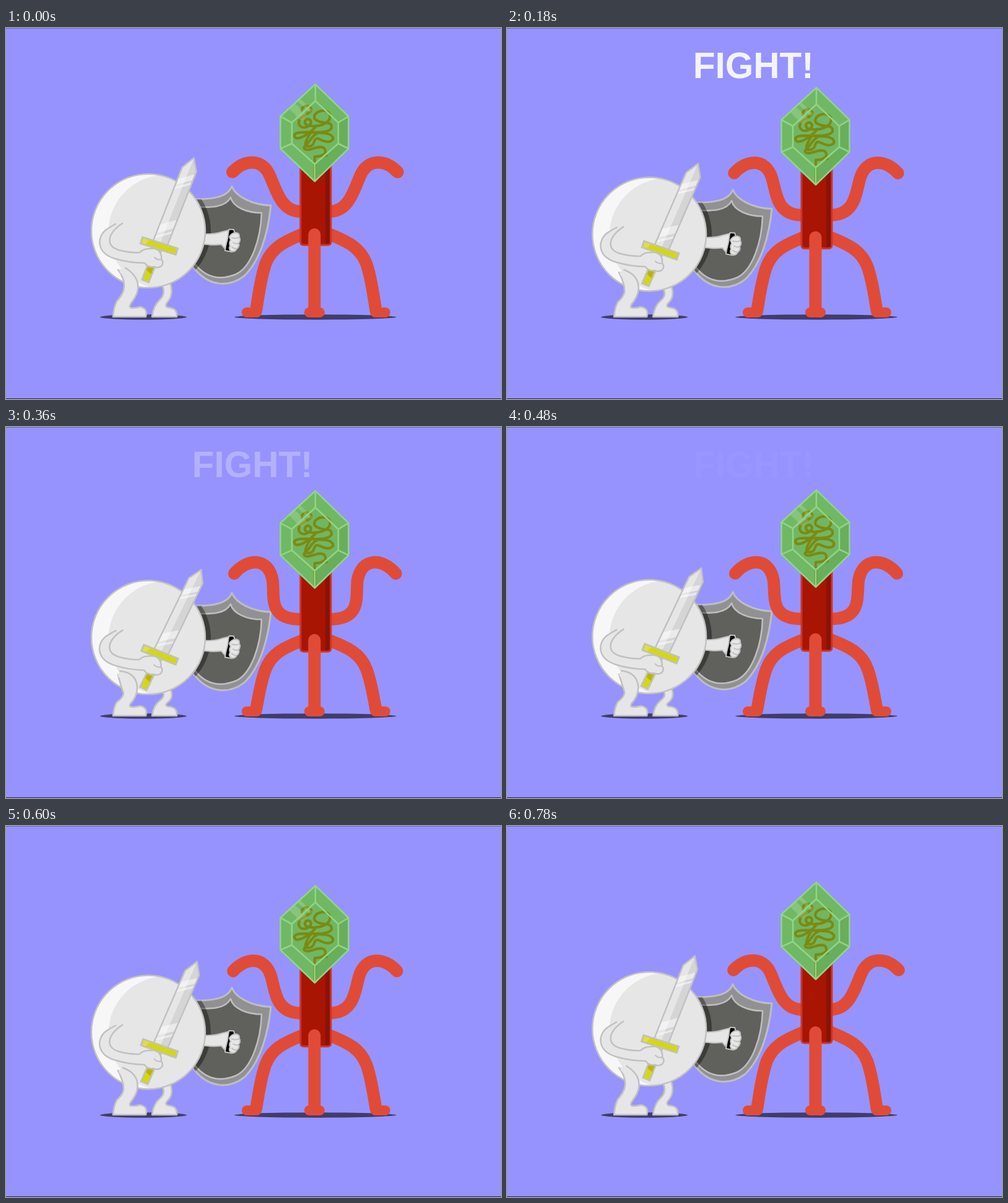
An HTML page that plays this animation: 800x600 px, repeating every 810 ms.

```html
<!DOCTYPE html>
<html lang="en">
<head>
<meta charset="utf-8">
<title>Fight</title>
<style>
  html, body { margin: 0; width: 100%; height: 100%; overflow: hidden; background: #9693ff; }
  svg { display: block; width: 800px; height: 600px; }
  .limb { fill: none; stroke: #e04b38; stroke-width: 20; stroke-linecap: round; stroke-linejoin: round; }
  .foot { fill: none; stroke: #e04b38; stroke-width: 16; stroke-linecap: round; }
  .pale { fill: #e6e6e6; stroke: #c1c1c1; stroke-width: 2.6; stroke-linejoin: round; stroke-linecap: round; }
  .line { fill: none; stroke: #c1c1c1; stroke-width: 2.5; stroke-linecap: round; stroke-linejoin: round; }
  .thin { stroke-width: 2; }
  .gold { fill: #d3d811; stroke: #c1c1c1; stroke-width: 2.6; }
  .edge { fill: none; stroke: #91d488; stroke-width: 2.6; stroke-linejoin: round; }
</style>
</head>
<body>
<svg viewBox="0 0 800 600">
  <defs>
    <clipPath id="ball"><circle cx="230" cy="328" r="92"/></clipPath>
    <clipPath id="shield"><path id="rim" d="M365 256C371 272 397 286 428 287C424 328 412 375 385 401C362 419 328 420 303 387V277C330 277 358 275 365 256Z"/></clipPath>
    <clipPath id="blade"><path id="steel" d="M-12 0V-132L0 -153L12 -134V0Z"/></clipPath>
  </defs>
  <rect width="800" height="600" fill="#9693ff"/>
  <rect width="800" height="1" fill="#6a68b6"/>
  <rect y="599" width="800" height="1" fill="#24204a"/>
  <text id="title" x="300.8" y="81" fill="#fff" font-family="'Liberation Sans', Arial, sans-serif" font-weight="700" font-size="58.5">FIGHT!</text>

  <g fill="#403d68">
    <ellipse cx="222" cy="467.5" rx="70" ry="4.2"/>
    <ellipse cx="500" cy="467.5" rx="131" ry="4.2"/>
  </g>

  <!-- knight -->
  <path id="farLeg" class="pale"/>
  <g class="bob">
    <use href="#rim" fill="#919191" stroke="#bebebe" stroke-width="3" stroke-linejoin="round"/>
    <path d="M363 274C367 290 390 299 413 299C412 340 397 386 372 398C348 408 324 406 304 380V289C332 291 355 290 363 274Z" fill="#60605c" stroke="#bebebe" stroke-width="2.6" stroke-linejoin="round"/>
    <circle cx="238" cy="328" r="93" fill="#000" opacity=".38" clip-path="url(#shield)"/>
    <path d="M358 329L361 325.500L368 326L371 336L365 362L354 360Z" fill="#000" stroke="#c1c1c1" stroke-width="2"/>
    <path class="pale thin" d="M316 333Q338 334 348 330L360 327L358 341L354 357L348 350Q336 352 316 349Z"/>
    <path class="pale thin" d="M361 338Q364 331 372 331Q378 332 377 338Q380 343 376 348Q378 353 373 357Q370 363 364 361Q359 358 362 352Q360 347 363 343Z"/>
    <path class="line thin" d="M376 339Q371 341 365 339M376 348Q372 350 367 347M372 357Q368 357 365 354"/>
    <circle cx="230" cy="328" r="92" fill="#f7f7f7"/>
    <circle cx="258" cy="330" r="92.500" fill="#e6e6e6" clip-path="url(#ball)"/>
    <circle cx="230" cy="328" r="92" class="line"/>
  </g>
  <path id="nearLeg" class="pale"/>
  <path id="hip" fill="none" stroke="#e6e6e6" stroke-width="6" stroke-linecap="round"/>

  <g id="sword">
    <path d="M-6 0H6V61H-6Z" class="gold"/>
    <path d="M-4.500 36H4.500V47L-4.500 44Z" fill="#bdb400"/>
    <use href="#steel" fill="#e6e6e6"/>
    <path d="M0 0V-153L12 -134V0Z" fill="#d5d5d5"/>
    <g clip-path="url(#blade)" fill="#fff" opacity=".5">
      <path d="M-14 -110L14 -131V-121L-14 -100ZM-14 -96L14 -117V-113L-14 -92Z"/>
      <path d="M-14 -31L14 -52V-37L-14 -16ZM-14 -11L14 -32V-28L-14 -7Z"/>
    </g>
    <use href="#steel" class="line"/>
    <g transform="rotate(-4)">
      <rect x="-30" y="-5.500" width="60" height="11" class="gold"/>
      <path d="M-28 -4H-18L-22 4H-28Z" fill="#e0dd4c"/>
    </g>
  </g>
  <g id="arm">
    <path id="sleeve" class="line" style="fill:#e6e6e6" d="M188 316C164 332 160 352 182 359Q200 364 216 363Q222 357 232 357Q244 355 249 363Q252 368 251 374Q256 379 251 385Q246 389 239 386Q230 388 224 380Q200 380 176 373C146 364 146 338 162 326Q168 322 177 317"/>
    <path class="line thin" d="M240 371Q245 376 251 374"/>
  </g>

  <!-- phage -->
  <path class="limb arm"/>
  <path class="limb arm" transform="matrix(-1 0 0 1 999 0)"/>
  <g id="legs">
    <path class="limb leg"/>
    <path class="foot" d="M389 460H405"/>
  </g>
  <use href="#legs" transform="matrix(-1 0 0 1 1002 0)"/>
  <g class="bob">
    <path d="M476 205H525V346Q525 351 520 351H481Q476 351 476 346Z" fill="#a81503"/>
    <path d="M516 205H524V350H516Z" fill="#8b1205"/>
    <path d="M476 205H525V346Q525 351 520 351H481Q476 351 476 346Z" fill="none" stroke="#ce3526" stroke-width="3"/>
  </g>
  <path id="midLeg" class="limb"/>
  <path class="foot" d="M490 460H507"/>
  <g class="bob">
    <path d="M500 91L553.500 143V195L499 248L443.500 195V143Z" fill="#70b863"/>
    <path d="M553.500 143V195L499 248V220L537 187V153Z" fill="#68ae5b"/>
    <path d="M500 118L537 153V187L499 220L462 187V153Z" fill="#71b662"/>
    <path d="M499 247V208L518 206M479 136C474 128 488 122 493 130C497 138 472 142 473 154C476 166 494 160 493 151C488 142 478 152 486 157C504 162 528 154 523 139C516 128 494 136 499 147C510 158 528 148 526 162C518 176 466 162 466 174C468 186 492 170 500 160C508 150 482 178 484 190C490 186 498 166 510 170C530 170 534 182 521 184C508 184 502 172 498 184C494 198 480 186 482 195C488 202 504 188 514 194C522 204 508 208 499 208" fill="none" stroke="#7a8b13" stroke-width="4.2" stroke-linecap="round" stroke-linejoin="round"/>
    <path d="M457 130L466 121L487 141L477 150ZM470 117L474 113L495 133L491 137Z" fill="#fff" opacity=".16"/>
    <path class="edge" d="M500 91L553.500 143V195L499 248L443.500 195V143ZM500 118L537 153V187L499 220L462 187V153ZM500 91V118M553.500 143L537 153M553.500 195L537 187M499 248V220M443.500 195L462 187M443.500 143L462 153"/>
  </g>
</svg>
<script>
const LOOP = 810, STEP = 30, SWAY = 780, DROP = 12.5;
const $ = s => document.querySelectorAll(s);
const smooth = k => k * k * (3 - 2 * k);

// Each limb: selector, standing pose, crouched pose, optional easing
const limbs = [
  ['.arm',
    'M366 233C386 212 414 211 426 238C437 262 444 296 476 297',
    'M369 237C390 212 424 210 431 248C434 276 424 311 476 311', smooth],
  ['.leg',
    'M480 333C446 347 430 356 420 380C411 405 408 435 404 458',
    'M480 345C446 358 428 368 419 393C411 415 408 438 404 458'],
  ['#midLeg', 'M498.500 334V458', 'M498.500 345V458'],
  ['#farLeg',
    'M250 412Q260 428 249 439Q238 449 236 467H276Q278 453 262 452Q255 450 262 442Q272 430 264 408Z',
    'M250 424Q260 434 249 442Q238 450 236 467H276Q278 453 262 452Q255 450 262 445Q273 436 264 420Z'],
  ['#nearLeg',
    'M181 391Q194 408 190 424Q187 433 179 442Q174 452 173 467H226Q230 453 216 451Q206 454 201 452Q198 450 205 441C216 426 220 405 193 388',
    'M181 401Q187 424 190 430Q190 437 179 445Q174 453 173 467H226Q230 453 216 451Q206 454 201 452Q198 450 205 443C218 424 214 397 184 395'],
  ['#hip', 'M187 394L193 400', 'M184 402L191 409']
];

const mix = (a, b, k) => {
  const to = b.match(/[\d.]+/g);
  let i = 0;
  return a.replace(/[\d.]+/g, n => (+n + (to[i++] - n) * k).toFixed(2));
};

const fade = t => t < 200 ? t / 200 : t < 540 ? ((540 - t) / 340) ** 2 : 0;

function draw(now) {
  const t = Math.floor((now % LOOP) / STEP) * STEP;
  const k = (1 - Math.cos(2 * Math.PI * t / SWAY)) / 2;
  const y = DROP * k;
  for (const g of $('.bob')) g.setAttribute('transform', `translate(0 ${y})`);
  for (const [sel, up, down, ease = k => k] of limbs)
    for (const p of $(sel)) p.setAttribute('d', mix(up, down, ease(k)));
  $('#sword')[0].setAttribute('transform', `translate(${247.5 + k} ${352.5 + 16 * k}) rotate(${21.5 + 4.5 * k})`);
  $('#arm')[0].setAttribute('transform', `translate(0 ${y}) rotate(${1.2 * k} 175 335)`);
  $('#title')[0].setAttribute('opacity', fade(t));
}

const start = performance.now();
function tick() {
  draw(performance.now() - start);
  requestAnimationFrame(tick);
}
tick();
</script>
</body>
</html>
```
